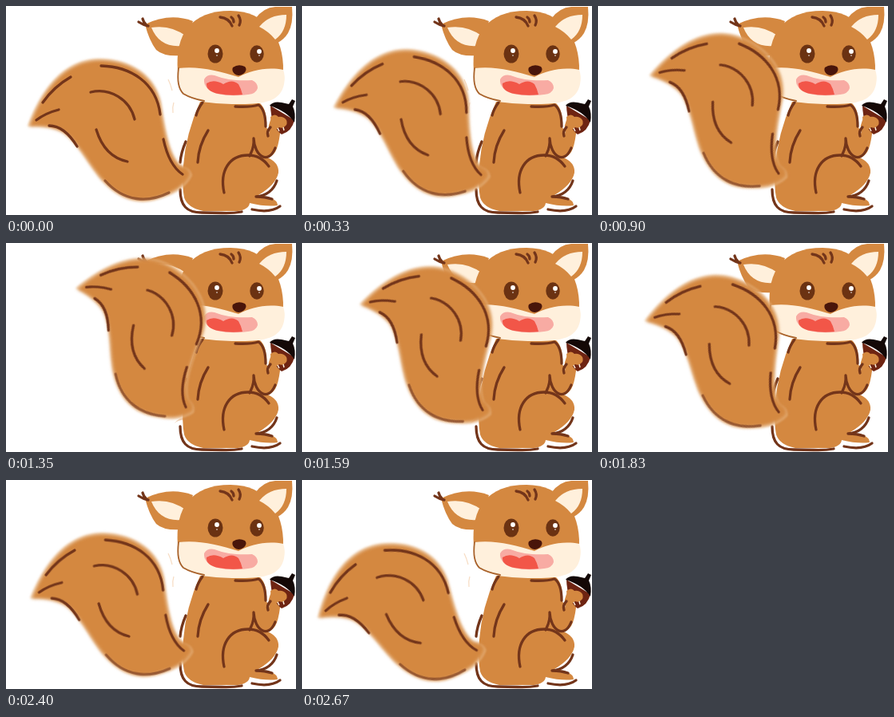
Animation of 363 by 262 pixels, one loop 2700 ms. Source, as an HTML page:

```html
<!DOCTYPE html>
<html lang="en">
<head>
<meta charset="utf-8">
<title>Squirrel wagging its tail</title>
<style>
  html, body { margin: 0; width: 100%; height: 100%; overflow: hidden; background: #fff; }
  svg { display: block; width: 363px; height: 262px; }
  .fur { fill: #d48840; }
  .cream { fill: #fff0dc; }
  .dark { fill: #6b3212; }
  .line { fill: none; stroke: #73351a; stroke-width: 3.3; stroke-linecap: round; stroke-linejoin: round; }
  .halo { fill: #eec79c; opacity: .6; filter: blur(1px); }
  .soft { filter: blur(2.3px); transform-origin: 127px 157px; transform: scale(.98); }
  #tail {
    transform-origin: 127px 157px;
    animation: wag 2700ms -1ms infinite;
  }
  /* Up for 45 steps, down for 44, then jump back to the start. */
  @keyframes wag {
    0% { transform: translate(0, 0) rotate(0deg); animation-timing-function: steps(45); }
    50% { transform: translate(43.7px, -45px) rotate(30deg); animation-timing-function: steps(44); }
    98.8889%, 100% { transform: translate(-7.4px, 12px) rotate(-5.7deg); }
  }
</style>
</head>
<body>
<svg viewBox="0 0 363 262">
  <defs>
    <path id="plume" d="M27 151C40 115 66 67 116 66C158 66 187 88 194 120C199 151 204 188 220 201Q231 203 233 212C227 226 212 235 200 239C172 251 147 247 122 221C104 202 91 172 70 158Q52 149 27 151Z"/>
  </defs>

  <path fill="none" stroke="#f7dcc2" stroke-width="1.2" d="M203 92Q206 98 208 106M210 121Q208 127 209 134"/>

  <g id="body">
    <path class="fur" opacity=".4" d="M211 226Q216 219 225 218V222Q217 221 211 226Z"/>
    <path class="fur" d="M243 120L318 122Q327 130 326 152L330 160Q326 150 334 138L350 138Q358 148 343 160Q341 176 337 183Q332 190 327 190Q342 196 341 209Q338 224 316 237L332 241Q340 244 340 250Q325 252 305 247Q304 255 290 257L247 257Q227 253 223 240Q220 224 222 200Q225 160 243 120Z"/>
    <g class="line">
      <path d="M246 121Q240 129 238 137M287 126Q306 127 316 124Q325 130 325 151"/>
      <path d="M253 156Q241 175 240 196M225 170Q219 184 218 196"/>
      <path d="M218 230C218 250 226 259 245 259L270 259.500Q284 260 295 258"/>
      <path d="M273 234C267 206 280 187 303 187C317 187 324 194 329 201"/>
      <path d="M310 166C311 178 307 183 305 188M310 166C311 188 328 200 337 178"/>
      <path d="M331 152Q326 157 328 163M313 239Q333 237 339 219M313 239Q324 239 333 242M308 255Q331 260 343 251"/>
    </g>
  </g>

  <g id="acorn">
    <path fill="#6e2412" d="M331 125L361 143Q358 157 345 161Q332 152 331 125Z"/>
    <path fill="#140806" d="M330 125Q334 119 345 121L354 123L358 117L362 119L359 126Q363 134 361 146Q352 132 330 125Z"/>
    <path class="fur" d="M331 139Q337 134 341 139Q347 138 351 143Q353 148 349 151Q346 154 342 152L338 155Q331 151 331 139Z"/>
    <path fill="none" stroke="#fff0dc" stroke-width="1.500" d="M340 153L342 157M347 152L348 156"/>
  </g>

  <g id="head">
    <path class="fur" d="M174 23Q205 8 234 19L221 62Q198 64 188 55Q179 43 174 23Z"/>
    <path class="cream" d="M182 27Q206 23 226 38Q221 43 219 50Q192 52 182 27Z"/>
    <path class="fur" d="M215 82C211 35 232 6 281 6C325 6 348 39 347 82Q333 103 281 104Q228 104 215 82Z"/>
    <path class="fur" d="M312 16Q322 2 337 1H358Q360 22 353 34Q348 42 340 46Z"/>
    <path class="cream" d="M317 26Q329 11 351 11Q351 32 337 42Q329 32 317 26Z"/>
    <path class="cream" d="M216 78C240 75 266 81 291 89C306 81 326 76 347 80Q350 88 348 98C344 119 324 123 294 123C264 123 240 121 227 113Q215 105 216 78Z"/>
    <path class="line" style="stroke: #a9622a; stroke-width: 1.8" d="M216 78Q213 101 222 110Q232 116 248 119"/>
    <g class="line">
      <path d="M166 20Q172 24 178 25M171 16Q172 20 175 23"/>
      <path d="M268 14Q279 15 283 25M282 14Q285 16 285 20M291 12Q295 18 292 24"/>
    </g>
    <ellipse class="dark" cx="262" cy="60" rx="9.500" ry="11.500"/>
    <ellipse class="dark" cx="314" cy="60" rx="8.700" ry="10.700"/>
    <g fill="#fff">
      <circle cx="264" cy="56" r="2.900"/><circle cx="264" cy="62" r=".8"/>
      <circle cx="317" cy="57" r="2.900"/><circle cx="317" cy="62" r=".8"/>
    </g>
    <path fill="#49150a" d="M284 77Q291 72 299 76Q303 80 297 85Q291 89 286 85Q282 81 284 77Z"/>
    <path fill="#f8aba3" d="M248 92Q252 85 261 87C276 93 292 94 308 93Q315 96 315 103Q313 110 303 111Q282 114 264 110Q247 104 248 92Z"/>
    <path fill="#f25648" d="M251 97Q260 91 272 98Q283 91 291 98Q294 103 296 111Q281 113 266 110Q250 107 251 97Z"/>
  </g>

  <g id="tail">
    <use href="#plume" class="halo"/>
    <use href="#plume" class="fur soft"/>
    <g class="line">
      <path d="M46 121Q60 101 81 89M119 75C155 76 188 95 193 136"/>
      <path d="M106 108C130 102 155 117 161 142M38 143Q50 134 66 130"/>
      <path d="M54 150Q73 150 89 176M113 155C120 178 133 191 152 195"/>
      <path d="M197 167C201 186 209 203 221 211"/>
      <path opacity=".65" d="M124 219C148 246 178 247 204 234"/>
    </g>
  </g>
</svg>
</body>
</html>
```
